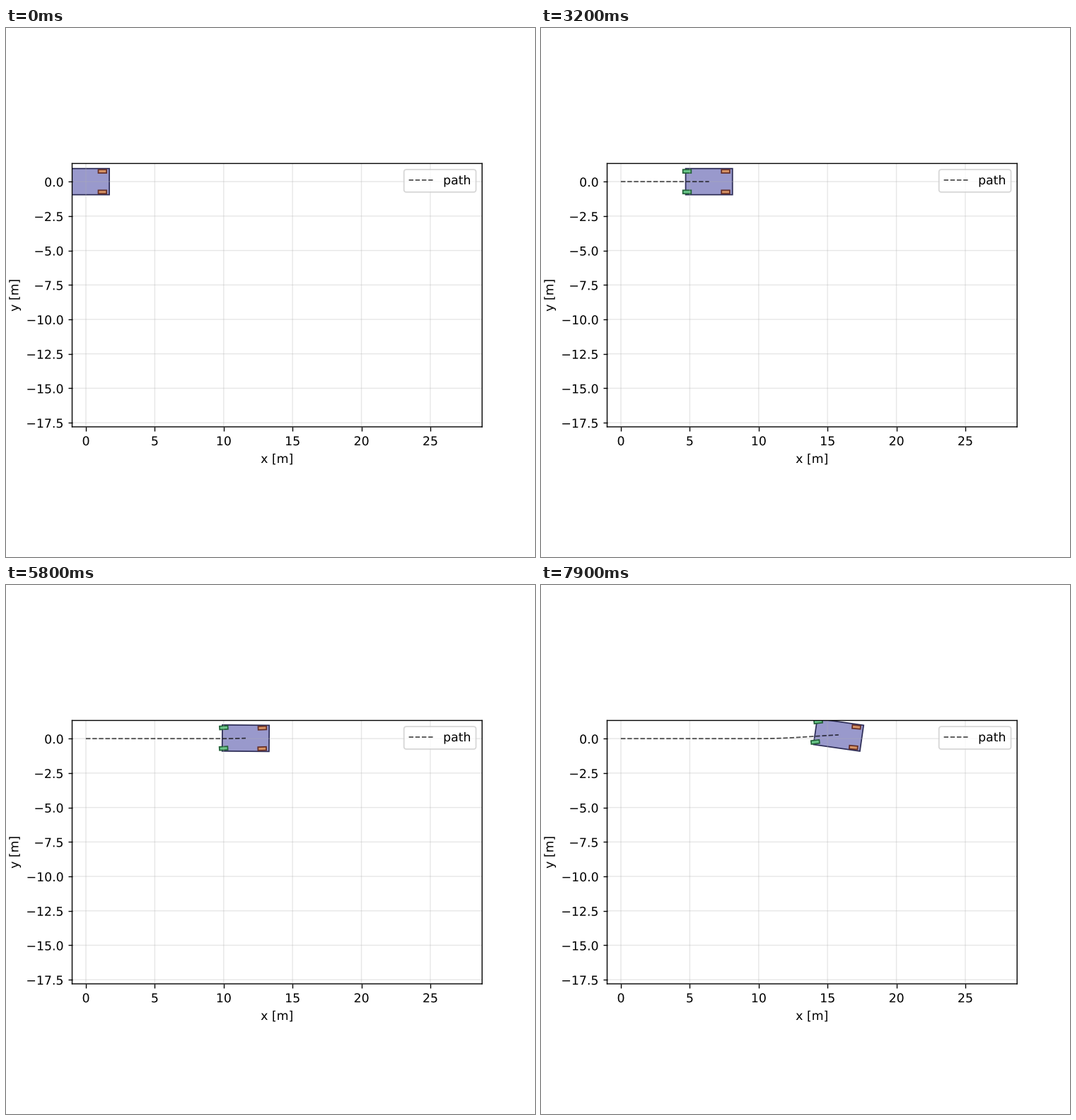
Recreate the animation shown at these times as a matplotlib script. Size 748x748 px, loop 8 s.

```python
import numpy as np
import matplotlib.pyplot as plt
from matplotlib.animation import FuncAnimation
from matplotlib.patches import Polygon
from matplotlib.patheffects import Normal
from matplotlib.text import Text

SIZE, INCHES = 748, 6
FRAMES, STEP_MS = 80, 100
SPEED = 2.0          # m/s
T_STEER = 5.0        # steering begins, s

LENGTH, WIDTH = 3.4, 1.9
FRONT, REAR, HALF_TRACK = 1.2, -1.6, 0.75
WHEEL_L, WHEEL_W = 0.6, 0.25

plt.rcParams["font.family"] = "DejaVu Sans"


def pose(t):
    """Centre position and heading at time t."""
    u = np.maximum(t - T_STEER, 0)
    x = SPEED * t
    y = 0.1644 * (1 - np.cos(np.pi * u / 4))
    heading = -np.radians(0.785) * u ** 2.2
    return x, y, heading


def steering(t):
    """Front and rear wheel angles relative to the body."""
    u = max(t - T_STEER, 0)
    return np.radians(3 * np.tanh(2 * u)), np.radians(5.1 * u)


def turn(points, angle):
    c, s = np.cos(angle), np.sin(angle)
    return points @ np.array([[c, s], [-s, c]])


def box(length, width):
    return np.array([[-1, -1], [1, -1], [1, 1], [-1, 1]]) * [length / 2, width / 2]


fig, ax = plt.subplots(figsize=(INCHES, INCHES), dpi=SIZE / INCHES)
ax.set_aspect("equal")
ax.set_xlim(-1, 28.76)
ax.set_ylim(-17.80, 1.32)
ax.set_xlabel("x [m]")
ax.set_ylabel("y [m]")
ax.grid(alpha=0.3)


def add_patch(face, edge):
    return ax.add_patch(Polygon(np.zeros((4, 2)), closed=True, fc=face, ec=edge, lw=1))


body = add_patch("#9999cc", "#2e2e58")
fronts = [add_patch("#d69264", "#652f28") for _ in range(2)]
rears = [add_patch("#6ac88a", "#24623a") for _ in range(2)]
path, = ax.plot([], [], "k--", lw=1, alpha=0.7, label="path")
ax.legend(loc="upper right")

# Place lines and glyphs at sub-pixel positions.
fig.canvas.draw()
for artist in fig.findobj():
    artist.set_snap(False)
for text in fig.findobj(Text):
    text.set_path_effects([Normal()])


def place_axle(wheels, offset, angle, heading, centre):
    for wheel, side in zip(wheels, (1, -1)):
        shape = turn(box(WHEEL_L, WHEEL_W), angle) + [offset, side * HALF_TRACK]
        wheel.set_xy(turn(shape, heading) + centre)


def update(i):
    times = np.arange(i + 1) * STEP_MS / 1000
    x, y, heading = pose(times)
    path.set_data(x, y)
    centre, psi = np.array([x[-1], y[-1]]), heading[-1]
    front, rear = steering(times[-1])
    body.set_xy(turn(box(LENGTH, WIDTH), psi) + centre)
    place_axle(fronts, FRONT, front, psi, centre)
    place_axle(rears, REAR, rear, psi, centre)
    return [body, *fronts, *rears, path]


anim = FuncAnimation(fig, update, frames=FRAMES, interval=STEP_MS,
                     repeat=True, repeat_delay=0, blit=False)
plt.show()
```
